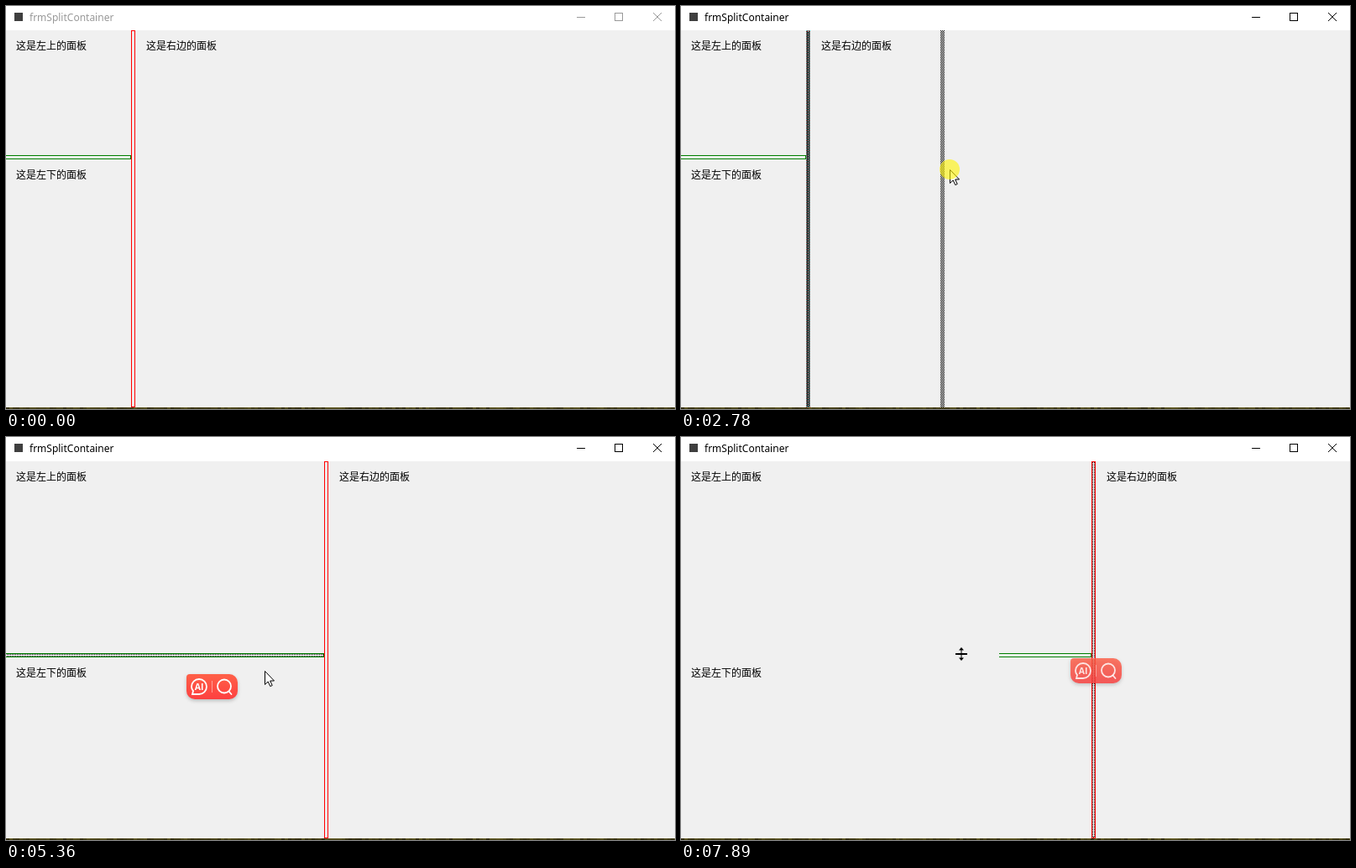
An HTML page with a canvas for the animation above (8 s loop, 797 by 481 pixels).

```html
<!DOCTYPE html>
<html lang="zh">
<head>
<meta charset="utf-8">
<title>frmSplitContainer</title>
<style>
html, body { margin: 0; width: 100%; height: 100%; overflow: hidden; background: #f0f0f0; }
canvas { display: block; }
</style>
</head>
<body>
<canvas id="stage" width="797" height="481"></canvas>
<script>
const W = 797, TOP = 29, BOTTOM = 479, LOOP = 8000, BAR = 5, STEP = 10;
const FACE = '#f0f0f0', DOT = '#0f0f0f';
const ctx = document.getElementById('stage').getContext('2d');

// Pointer moves: p is the ease-out power, bx and by bow the path sideways.
// A drag holds the button until release; its popup fades after a delay.
const MOVES = [
  { from: 260, to: 1020, x: 154, y: 192, p: 1.4, bx: -170 },
  { from: 1090, to: 1110, x: 153, y: 191 },
  { from: 2240, to: 3060, x: 384, y: 196, p: 1.2, drag: 'x', release: 3230, fade: 630 },
  { from: 3230, to: 4060, x: 242, y: 181, p: 1.6, by: 18 },
  { from: 4410, to: 5090, x: 242, y: 265, p: 1.1, bx: -4, drag: 'y', release: 5170, fade: 890 },
  { from: 5170, to: 6120, x: 381, y: 246, p: 2.9, by: 23 },
  { from: 6600, to: 7080, x: 491, y: 246, p: 2.6, drag: 'x', release: 7280, fade: 540 },
  { from: 7280, to: 7890, x: 334, y: 259, p: 2 }
];

function pointer(t) {
  let pos = { x: 363, y: 470 };
  for (const { from, to, x, y, p = 1, bx = 0, by = 0 } of MOVES) {
    if (t < from) break;
    const e = 1 - (1 - Math.min(1, (t - from) / (to - from))) ** p;
    const bow = Math.sin(Math.PI * e);
    pos = {
      x: Math.round(pos.x + (x - pos.x) * e + bx * bow),
      y: Math.round(pos.y + (y - pos.y) * e + by * bow)
    };
  }
  return pos;
}

// Splitter places, focus and the drag in progress at time t
function layout(t, mouse) {
  const s = { x: 149, y: 178, left: 0, focus: '', drag: '', shift: 0 };
  for (const { from, release, drag } of MOVES) {
    if (!drag || t < from) continue;
    const at = t < release ? mouse : pointer(release);
    const shift = Math.floor((at[drag] - pointer(from)[drag]) / STEP) * STEP;
    s.focus = drag;
    s.left = 0;
    if (t < release) {
      s.drag = drag;
      s.shift = shift;
    } else {
      // Only the freshly exposed part of the green bar is repainted
      if (drag === 'x') s.left = s.x;
      s[drag] += shift;
    }
  }
  return s;
}

function rect(x, y, w, h, color) {
  ctx.fillStyle = color;
  ctx.fillRect(x, y, w, h);
}

function line(points, color, width) {
  ctx.beginPath();
  points.forEach(([x, y]) => ctx.lineTo(x, y));
  ctx.strokeStyle = color;
  ctx.lineWidth = width;
  ctx.stroke();
}

function shape(points, color) {
  ctx.beginPath();
  points.forEach(([x, y]) => ctx.lineTo(x, y));
  ctx.closePath();
  ctx.fillStyle = color;
  ctx.fill();
}

function text(str, x, y, color = '#000', font = '12px "Noto Sans CJK SC", "Noto Sans CJK", sans-serif') {
  ctx.font = font;
  ctx.fillStyle = color;
  ctx.fillText(str, x, y);
}

function checker(color) {
  const c = document.createElement('canvas');
  c.width = c.height = 2;
  const g = c.getContext('2d');
  g.fillStyle = color;
  g.fillRect(0, 0, 1, 1);
  g.fillRect(1, 1, 1, 1);
  return ctx.createPattern(c, 'repeat');
}
const halftone = checker('#fff'), dots = checker(DOT);

function frame(x, y, w, h, paint) {
  rect(x, y, w, 1, paint);
  rect(x, y + h - 1, w, 1, paint);
  rect(x, y + 1, 1, h - 2, paint);
  rect(x + w - 1, y + 1, 1, h - 2, paint);
}

function inverted(drawing) {
  ctx.globalCompositeOperation = 'difference';
  drawing();
  ctx.globalCompositeOperation = 'source-over';
}

function titleBar(active) {
  const ink = active ? '#000' : '#999';
  rect(0, 0, W, TOP, '#fff');
  rect(10, 8, 10, 10, '#3f3f3f');
  text('frmSplitContainer', 28, 18, ink, '12px "Noto Sans", "Open Sans", sans-serif');
  rect(680, 13, 10, 1, ink);
  frame(725, 8, 10, 10, ink);
  line([[771, 8], [781, 18]], ink, 1);
  line([[781, 8], [771, 18]], ink, 1);
}

function desktopStrip() {
  let seed = 7;
  const rnd = () => (seed = seed * 16807 % 2147483647) / 2147483647;
  for (let x = 0; x < W; x += 4) {
    const v = 55 + 45 * rnd();
    rect(x, BOTTOM, 4, 1, `rgb(${v + 8},${v},${v * 0.45})`);
    rect(x, BOTTOM + 1, 4, 1, `rgb(${v * 0.8},${v * 0.75},${v * 0.3})`);
  }
}

function splitter(x, y, w, h, color, focused, dragging) {
  rect(x, y, w, h, FACE);
  frame(x, y, w, h, color);
  if (focused) frame(x + 1, y + 1, w - 2, h - 2, dots);
  if (dragging) inverted(() => frame(x, y, w, h, halftone));
}

function arrowCursor() {
  const p = [[0.5, 0.5], [0.5, 16.5], [4.2, 13], [6.8, 18.6], [9.2, 17.5], [6.7, 12], [11.5, 12]];
  shape(p, '#fff');
  line([...p, p[0]], '#000', 1);
}

function sizeCursor(turn) {
  ctx.rotate(turn);
  rect(-1, -7, 2, 14, '#000');
  rect(-6, -0.5, 12, 1, '#000');
  for (const s of [-1, 1]) shape([[8 * s, 0], [4.5 * s, -3], [4.5 * s, 3]], '#000');
}

function cursor(m, s) {
  const overX = m.x >= s.x && m.x < s.x + BAR;
  const overY = m.x < s.x && m.y >= s.y && m.y < s.y + BAR;
  ctx.save();
  ctx.translate(m.x, m.y);
  if (overX) sizeCursor(0);
  else if (overY) sizeCursor(Math.PI / 2);
  else arrowCursor();
  ctx.restore();
}

function popup({ x, y, release, fade }, t) {
  const age = t - release;
  if (age < 80 || age >= fade + 400) return;
  ctx.save();
  ctx.translate(x - 27, y + 18);
  ctx.globalAlpha = Math.min(1, 1 - (age - fade) / 400);
  const fill = ctx.createLinearGradient(0, 0, 0, 30);
  fill.addColorStop(0, '#ff6048');
  fill.addColorStop(1, '#fd4040');
  ctx.fillStyle = fill;
  ctx.shadowColor = 'rgba(0,0,0,0.22)';
  ctx.shadowBlur = 4;
  ctx.shadowOffsetY = 2;
  ctx.beginPath();
  ctx.roundRect(0, 0, 61, 30, [4, 10, 10, 10]);
  ctx.fill();
  ctx.shadowColor = 'transparent';

  ctx.strokeStyle = '#fff';
  ctx.lineWidth = 1.8;
  ctx.lineCap = 'round';
  ctx.beginPath();
  ctx.arc(15, 15, 9, Math.PI, Math.PI * 2.5);
  ctx.lineTo(7, 24);
  ctx.lineTo(8, 20);
  ctx.quadraticCurveTo(6, 18, 6, 15);
  ctx.stroke();
  ctx.textAlign = 'center';
  text('AI', 15, 19, '#fff', 'bold 10.5px "Open Sans", sans-serif');
  rect(30, 8, 1, 14, 'rgba(255,255,255,0.45)');
  ctx.beginPath();
  ctx.arc(45, 14.5, 8, 0, Math.PI * 2);
  ctx.stroke();
  line([[50.5, 20.5], [53.5, 24]], '#fff', 1.8);
  ctx.restore();
}

function dragBar(s) {
  const tall = BOTTOM - TOP;
  if (s.drag === 'x') {
    // The old place stays darkened while the bar is away
    rect(s.x + 1, TOP + 1, 1, tall - 2, DOT);
    rect(s.x + 3, TOP + 1, 1, tall - 2, DOT);
    rect(s.x + 2, TOP + 1, 1, tall - 2, dots);
    inverted(() => rect(s.x + s.shift, TOP, BAR, tall, halftone));
  } else {
    inverted(() => rect(0, s.y + s.shift, s.x, BAR, halftone));
  }
}

function highlight({ x, y }) {
  ctx.beginPath();
  ctx.arc(x, y, 12, 0, Math.PI * 2);
  ctx.fillStyle = 'rgba(255,244,0,0.6)';
  ctx.fill();
}

function draw(now) {
  const t = now % LOOP;
  const m = pointer(t);
  const s = layout(t, m);

  rect(0, 0, W, 481, FACE);
  titleBar(s.focus !== '');
  desktopStrip();
  // The bar starts outside the clip so that its left end stays open
  ctx.save();
  ctx.beginPath();
  ctx.rect(s.left, 0, W, BOTTOM);
  ctx.clip();
  splitter(-2, s.y, s.x + 2, BAR, '#008000', s.focus === 'y', s.drag === 'y');
  ctx.restore();
  splitter(s.x, TOP, BAR, BOTTOM - TOP, '#f00', s.focus === 'x', s.drag === 'x');
  text('这是左上的面板', 12, 52);
  text('这是左下的面板', 12, s.y + 28);
  text('这是右边的面板', s.x + 18, 52);

  if (s.shift > 0) dragBar(s);
  MOVES.filter(v => v.drag).forEach(v => popup(v, t));
  if (t >= MOVES[0].from) cursor(m, s);
  if (s.drag) highlight(m);
}

let start;
function tick(now) {
  if (start === undefined) start = now;
  draw(now - start);
  requestAnimationFrame(tick);
}
draw(0);
requestAnimationFrame(tick);
</script>
</body>
</html>
```
